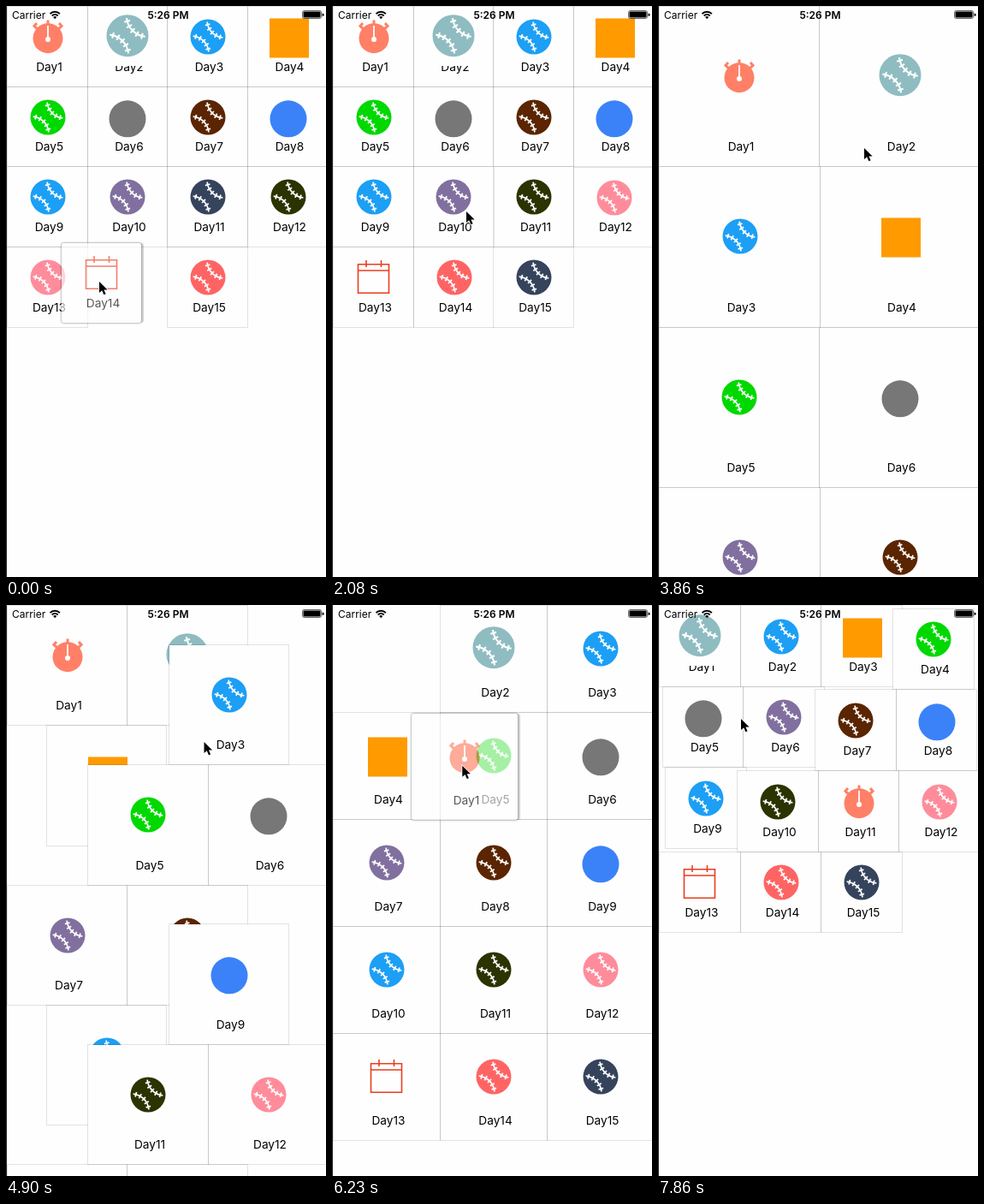
Write an HTML page that moves like this. It is 374 px wide and 667 px high and loops after 8 s.

```html
<!DOCTYPE html>
<html lang="en">
<head>
<meta charset="utf-8">
<title>Sortable day grid</title>
<style>
  html, body { margin: 0; width: 100%; height: 100%; overflow: hidden; }
  body { position: relative; background: #fefefe; color: #000; font-family: Inter, Roboto, sans-serif; }
  .cell {
    position: absolute; box-sizing: border-box;
    border: 1px solid rgba(0, 0, 0, .11);
    background: #fefefe; background-clip: padding-box;
  }
  .cell span {
    position: absolute; left: 2px; right: -2px; bottom: 12.7px;
    font-size: 13.7px; line-height: 20px; text-align: center;
  }
  .cell svg {
    position: absolute; width: 70px; height: 70px;
    left: calc(50% - 35px); top: calc(48.85% - 45.3px);
  }
  .lifted {
    opacity: .65; border-radius: 4px;
    box-shadow: 0 0 2px rgba(0, 0, 0, .3), 3px 0 1px -1px rgba(0, 0, 0, .25);
  }
  #edge { position: absolute; left: 0; top: 0; width: 1px; height: 100%; background: #222; z-index: 90; }
  #bar { position: absolute; left: 0; top: 0; z-index: 91; }
  #bar text { font-size: 12px; }
  #cursor { position: absolute; left: -2px; top: -2px; z-index: 99; }
</style>
</head>
<body>
<div id="edge"></div>
<svg id="bar" width="374" height="22">
  <text x="7" y="14.5">Carrier</text>
  <path d="M51.5 9.2a8 8 0 0 1 11.4 0M53.7 11.5a5 5 0 0 1 7 0" fill="none" stroke="#000" stroke-width="1.9"/>
  <path d="M57.2 15.2l-2-2.2a3 3 0 0 1 4 0z"/>
  <text x="189.5" y="14.5" font-weight="600" text-anchor="middle">5:26 PM</text>
  <rect x="346.5" y="5.5" width="22" height="9" rx="2" fill="none" stroke="#000" stroke-opacity=".6"/>
  <rect x="347.5" y="6.5" width="20" height="7" rx="1"/>
  <path d="M369.6 8.5q2 .2 2 1.8t-2 1.8z"/>
</svg>
<svg id="cursor" width="18" height="24">
  <path d="M2 2v13l3.2-2.8 2.2 5 2.2-.9-2.2-4.9h4.2z" stroke="#fff" stroke-width="1.6" paint-order="stroke"/>
</svg>
<script>
const LOOP = 8000, STEPS = 54, TICK = 148.4;
const MOVE = 300, GLIDE = 600;

// ---- icons, drawn around 0,0 ----
const disc = (color, r = 21.5, y = 1.8) => `<circle cy="${y}" r="${r}" fill="${color}"/>`;

function ball(color, r = 20.5, y = 0) {
  const polar = (deg, d) => {
    const a = deg * Math.PI / 180;
    return `${(.95 + d * Math.cos(a)) * r} ${(-.95 + d * Math.sin(a)) * r}`;
  };
  let seam = `M${polar(174, 1)}A${r} ${r} 0 0 0 ${polar(96, 1)}`;
  for (let a = 105; a <= 165; a += 15) seam += `M${polar(a, .86)}L${polar(a, 1.14)}`;
  const path = turn => `<path d="${seam}" transform="rotate(${turn})"/>`;
  return `<g transform="translate(0 ${y})">${disc(color, r, 0)}
    <g fill="none" stroke="#fff" stroke-width="${r * .085}">${path(0)}${path(180)}</g></g>`;
}

const stopwatch = `${disc('#ff8066', 17.5, 1.7)}
  <path d="M0 -19.5v5M-15.5 -12l4 3.4M15.5 -12l-4 3.4M-17 -11.5l4 -4.5M17 -11.5l-4 -4.5"
    stroke="#ff8066" stroke-width="3"/>
  <path d="M0 -13v15" stroke="#fff" stroke-width="1.8"/><circle cy="3" r="3" fill="#fff"/>`;

const calendar = `<path d="M-18.5 -15.3h36v33.5h-36zM-18.5 -8h36M-9 -20v8M8.5 -20v8"
  fill="none" stroke="#ec3d1f" stroke-width="1.6"/>`;

const icons = [
  stopwatch,
  '<path d="M-35 -35h70v69h-70z" fill="#fefefe"/>' + ball('#8fbcc1', 24.5, -1.3),
  ball('#1c9ff5'),
  '<rect x="-22" y="-21.5" width="46" height="46" fill="#ff9a00"/>',
  ball('#00d800'),
  disc('#777'),
  ball('#5a2500'),
  disc('#3b82f9'),
  ball('#1c9ff5'),
  ball('#81709f'),
  ball('#35435c'),
  ball('#2b3300'),
  ball('#ff8c9b'),
  calendar,
  ball('#ff6464')
];

const cells = icons.map(icon => {
  const el = document.createElement('div');
  el.className = 'cell';
  el.innerHTML = `<span></span><svg viewBox="-35 -35 70 70">${icon}</svg>`;
  return document.body.appendChild(el);
});
const cursor = document.getElementById('cursor');

// ---- story: each layout eases from the one before ----
const layouts = [{ t: -MOVE, cols: 4, order: icons.map((_, i) => i) }];
const drags = [];

function setColumns(t, cols) {
  layouts.push({ ...layouts.at(-1), t, cols });
}
function drag(lift, drop, from, to) {
  const order = [...layouts.at(-1).order];
  const [id] = order.splice(from, 1);
  order.splice(to, 0, id);
  drags.push({ id, lift, drop });
  layouts.push({ ...layouts.at(-1), t: drop - MOVE, order });
}

drag(-500, 300, 13, 13);
drag(800, 1450, 10, 14);
drag(2150, 2670, 9, 6);
setColumns(3497, 2);
setColumns(4700, 3);
drag(5592, 6800, 0, 10);
setColumns(7602, 4);

// Pointer stops: arrival time and place.
const stops = [
  [0, 109, 322], [300, 141, 327], [750, 234, 236], [1350, 236, 328], [2080, 157, 240],
  [2650, 245, 121], [2820, 258, 146], [3500, 241, 166], [5400, 62, 55], [5640, 152, 160],
  [6700, 155, 437], [7410, 62, 225], [7720, 97, 133]
];

// ---- motion ----
const mix = (a, b, p) => a + (b - a) * p;

// Cubic ease in-out, control points (.42, 0) and (.58, 1).
function ease(x) {
  let lo = 0, hi = 1;
  for (let i = 0; i < 20; i++) {
    const u = (lo + hi) / 2, v = 1 - u;
    if (3 * u * v * (.42 * v + .58 * u) + u ** 3 < x) lo = u; else hi = u;
  }
  return lo * lo * (3 - 2 * lo);
}

// The pointer rests at each stop and glides just in time for the next.
function pointer(t) {
  const i = stops.findIndex(s => s[0] > t);
  if (i < 1) return stops.at(i < 0 ? -1 : 0).slice(1);
  const [t0, x0, y0] = stops[i - 1], [t1, x1, y1] = stops[i];
  const span = Math.min(GLIDE, t1 - t0), p = ease((t - t1 + span) / span);
  return [mix(x0, x1, p), mix(y0, y1, p)];
}

function slot({ cols, order }, id) {
  const i = order.indexOf(id), size = 375 / cols;
  return [1 + i % cols * size, Math.floor(i / cols) * size, size];
}

const snap = v => Math.ceil(v - .5);

function draw(t) {
  const n = layouts.findLastIndex(l => l.t <= t);
  const now = layouts[n], before = layouts[Math.max(0, n - 1)];
  const p = ease((t - now.t) / MOVE);

  cells.forEach((el, id) => {
    const from = slot(before, id), to = slot(now, id);
    let [x, y, size] = to.map((v, k) => mix(from[k], v, p));
    const index = now.order.indexOf(id);
    const held = drags.find(d => d.id === id && t >= d.lift && t < d.drop + MOVE);
    const lifted = !!held && t < held.drop;
    if (held) {
      // The held cell centres itself under the pointer, then falls back into its slot.
      const grip = ease((t - held.lift) / MOVE) - ease((t - held.drop) / MOVE);
      const [px, py] = pointer(Math.min(t, held.drop));
      x = mix(x, px + 2 - size / 2, grip);
      y = mix(y, py + 1 - size / 2, grip);
    }
    const left = snap(x), top = snap(y);
    el.style.left = left + 'px';
    el.style.top = top + 'px';
    el.style.width = snap(x + size) - left + 1 + 'px';
    el.style.height = snap(y + size) - top + 1 + 'px';
    el.style.zIndex = lifted && t > held.lift + MOVE / 2 ? 50 : index;
    el.classList.toggle('lifted', lifted);
    el.firstChild.textContent = 'Day' + (index + 1);
  });

  const [cx, cy] = pointer(t);
  cursor.style.transform = `translate(${cx}px, ${cy}px)`;
}

// The picture advances in even ticks, like a screen recording.
const start = performance.now();
function frame() {
  const t = (performance.now() - start) % LOOP;
  draw(Math.floor(t * STEPS / LOOP) * TICK);
  requestAnimationFrame(frame);
}
frame();
</script>
</body>
</html>
```
